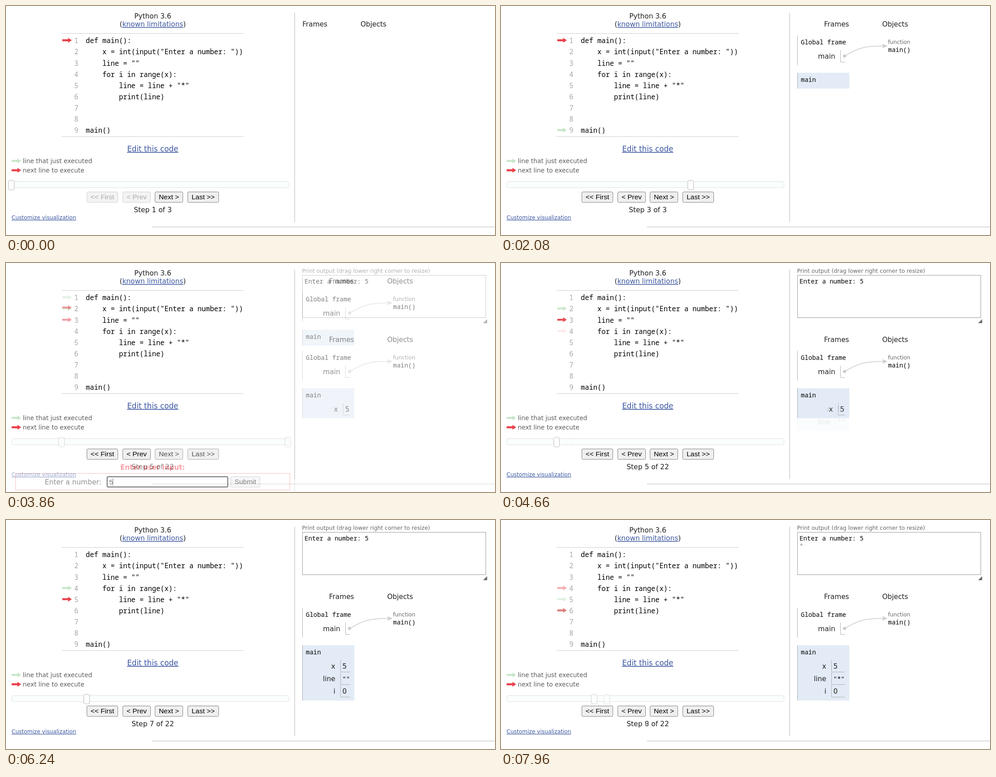
These frames come from a looping animation (1091x513 px, 8 s). An HTML page:

```html
<!DOCTYPE html>
<html lang="en">
<head>
<meta charset="utf-8">
<title>Code visualizer</title>
<style>
  html, body { margin: 0; width: 100%; height: 100%; overflow: hidden; background: #fff; }
  svg { position: absolute; left: 0; top: 0; width: 1091px; height: 513px; background: #fff; }
  text { font-family: "DejaVu Sans", sans-serif; font-size: 15.35px; fill: #222; white-space: pre; }
  .code { font-family: "Noto Sans Mono", monospace; font-size: 15.4px; fill: #000; }
  .mono { font-family: "Noto Sans Mono", monospace; font-size: 14px; fill: #000; }
  .num { font-family: "Noto Sans Mono", monospace; fill: #a6a6a6; }
  .btn { font-family: "Liberation Sans", sans-serif; font-size: 15.5px; fill: #000; }
  .off { fill: #aaa; }
  .link { fill: #3d58a2; text-decoration: underline; }
  .note { font-size: 13.8px; fill: #5c5c5c; }
  .small { font-size: 12.2px; fill: #666; }
  .alert { font-size: 15.05px; font-weight: bold; fill: #e93f4a; }
</style>
</head>
<body>
<script>
const HOLD = 500, STEP = 60, CYCLE = 1040, LOOP = 8000;
const RED = '#e93f4a', GREEN = '#c9e6ca';
const CODE = [
  'def main():',
  '    x = int(input("Enter a number: "))',
  '    line = ""',
  '    for i in range(x):',
  '        line = line + "*"',
  '        print(line)',
  '', '',
  'main()'
];

// done / next: line numbers; knob: slider x; vars and edge: contents of the main frame
const three = (n, more) => ({ label: `Step ${n} of 3`, knob: 12 + 205.6 * (n - 1), ...more });
const many = (n, done, next, edge, vars, out = '') =>
  ({ label: `Step ${n} of 22`, knob: 12 + 28 * (n - 1), done, next, edge, vars, out, printed: true, main: true, global: true });
const STATES = [
  three(1, { next: 1, off: [0, 1] }),
  three(2, { done: 1, next: 9, global: true, active: true }),
  three(3, { done: 9, next: 1, global: true, main: true }),
  { knob: 629, done: 1, next: 2, lift: 2.3, off: [2, 3], global: true, main: true, prompt: true },
  many(5, 2, 3, 752, [['x', '5']]),
  many(6, 3, 4, 746, [['x', '5'], ['line', '""']]),
  many(7, 4, 5, 746, [['x', '5'], ['line', '""'], ['i', '0']]),
  many(8, 5, 6, 737, [['x', '5'], ['line', '"*"'], ['i', '0']]),
  many(9, 6, 4, 737, [['x', '5'], ['line', '"*"'], ['i', '0']], '*')
];

const esc = s => s.replace(/&/g, '&amp;').replace(/</g, '&lt;').replace(/>/g, '&gt;');
const text = (x, y, s, cls = '', anchor = 'start', size = 0) =>
  `<text x="${x}" y="${y}" class="${cls}" text-anchor="${anchor}"${size ? ` style="font-size:${size}px"` : ''}>${esc(s)}</text>`;
const rect = (x, y, w, h, fill, stroke = 'none', r = 0, sw = 1) =>
  `<rect x="${x}" y="${y}" width="${w}" height="${h}" rx="${r}" fill="${fill}" stroke="${stroke}" stroke-width="${sw}"/>`;
const path = (d, stroke, sw = 1, fill = 'none') =>
  `<path d="${d}" fill="${fill}" stroke="${stroke}" stroke-width="${sw}"/>`;
const arrow = (x, y, fill) =>
  path(`M${x} ${y - 2.2}h13v-3.3l8.3 5.5-8.3 5.5v-3.3h-13z`, 'none', 0, fill);
const button = (x, y, w, s, off, edge = '#808080') =>
  rect(x + .5, y + .5, w - 1, 23.5, off ? '#f3f3f3' : '#efefef', off ? '#d0d0d0' : edge, 2.5) +
  text(x + w / 2, y + 17, s, off ? 'btn off' : 'btn', 'middle');

function codePane(s) {
  const rowY = n => 77.3 + 25.15 * (n - 1);
  let m = text(327.5, 28, 'Python 3.6', '', 'middle') +
    `<text x="327.3" y="46.3" text-anchor="middle">(<tspan class="link">known limitations</tspan>)</text>` +
    path('M124 61.5H530M124 292.5H530', '#ccc');
  CODE.forEach((line, i) => {
    const y = Math.round(rowY(i + 1) + 5.9);
    m += text(152.3, y, String(i + 1), 'num');
    const body = line.trimStart();
    m += text(178 + (line.length - body.length) * 9.24, y, body, 'code');
  });
  if (s.done) m += arrow(125.5, rowY(s.done) - .5, GREEN);
  m += arrow(125.5, rowY(s.next) - .5 - (s.lift || 0), RED);
  return m + text(327.3, 326, 'Edit this code', 'link', 'middle', 16.8) +
    arrow(12.5, 347, GREEN) + text(37.5, 352, 'line that just executed', 'note') +
    arrow(12.5, 368, RED) + text(37.5, 373, 'next line to execute', 'note');
}

function controls(s) {
  let m = rect(13, 393.5, 618.5, 13.5, '#fafefd', '#dcdfde', 4) +
    rect(s.knob - 6.5, 390.5, 13, 21.5, '#fefefe', '#b4b4b4', 4);
  [[180, 70, '<< First'], [260, 63, '< Prev'], [332, 63, 'Next >'], [405, 70, 'Last >>']]
    .forEach(([x, w, t], i) => m += button(x, 416, w, t, (s.off || []).includes(i)));
  if (s.prompt) {
    return m + text(327, 463, 'Enter user input:', 'alert', 'middle') +
      rect(21.5, 471.5, 612, 37, 'none', '#ee7f80') +
      text(86.5, 495.5, 'Enter a number:', '', 'start', 15.5) +
      rect(225.7, 478.7, 269, 23, '#fff', '#101010', 2.5, 2.4) +
      text(230, 495.5, '5', 'btn') + path('M238.5 482V499', '#000') +
      button(501, 478, 66, 'Submit', false, '#a8a8a8') + path('M644 15V513', '#d8d8d8', 2);
  }
  return m + text(327.5, 462.3, s.label, '', 'middle', 15.5) +
    text(12.5, 478, 'Customize visualization', 'link', 'start', 12.2) +
    path('M644 15V484', '#d8d8d8', 2) + path('M326 495H1091', '#ccc', 1.4);
}

function variable(edge, y, name, value) {
  const quoted = value[0] === '"';
  return text(edge - 11.3, y, name, '', 'end') +
    (value ? text(edge + 4.5, y, value, quoted ? 'mono' : '') : '') +
    path(`M${edge + .5} ${y - 19}v26.5H767.5`, '#b0b0b0');
}

function frameBox(y, h, title, active) {
  return (active ? rect(661, y, 116, h, '#e2ebf6') : '') +
    path(`M661.5 ${y}v${h}`, '#aaa') + text(669, y + 20.3, title, 'mono');
}

function heap(s) {
  const dx = s.global ? 59.5 : 0;
  let m = text(661.3 + dx, 45.7, 'Frames') + text(790.9 + dx, 45.7, 'Objects');
  if (s.global) {
    const ink = s.active ? '#205a90' : '#ccc';
    m += frameBox(66, 66.5, 'Global frame', s.active) + variable(757, 118, 'main', '') +
      `<circle cx="766.5" cy="112" r="3.6" fill="${ink}"/>` +
      path('M767 112C795 95 810 89 855 89.6', ink, 1.6) +
      path('M862 89.6L850.5 85l3.2 4.6-3.2 4.6z', ink, .5, ink) +
      text(863.5, 84.5, 'function', 'small') + text(863.5, 103, 'main()', 'mono');
  }
  if (s.main) {
    const vars = s.vars || [];
    m += frameBox(149.5, vars.length ? 38.7 + 28.4 * vars.length : 35.5, 'main', true);
    vars.forEach(([name, value], i) => m += variable(s.edge, 202 + 28.1 * i, name, value));
  }
  return m;
}

function output(s) {
  return text(660.5, 21.8, 'Print output (drag lower right corner to resize)', 'small', 'start', 12.35) +
    rect(661.5, 27.5, 409, 95, '#fff', '#999') +
    text(666, 46, 'Enter a number: 5', 'mono') + text(666, 63, s.out, 'mono') +
    path('M1073.5 126v8.8h-9z', 'none', 0, '#666');
}

const layers = STATES.map(s => {
  const right = s.printed ? output(s) + `<g transform="translate(0 131)">${heap(s)}</g>` : heap(s);
  document.body.insertAdjacentHTML('beforeend',
    `<svg viewBox="0 0 1091 513">${codePane(s) + controls(s) + right}</svg>`);
  return document.body.lastElementChild;
});

// Each state holds, then the next one dissolves in over ten equal steps.
function draw(t) {
  const current = Math.floor(t / CYCLE), into = t % CYCLE - HOLD;
  const mix = into < 0 ? 0 : (Math.floor(into / STEP) + 1) / 10;
  layers.forEach((el, i) => {
    const opacity = i === current ? 1 : i === current + 1 ? mix : 0;
    el.style.opacity = opacity;
    el.style.visibility = opacity ? 'visible' : 'hidden';
  });
}

const start = performance.now();
function tick(now) {
  draw(Math.max(0, now - start) % LOOP);
  requestAnimationFrame(tick);
}
draw(0);
requestAnimationFrame(tick);
</script>
</body>
</html>
```
